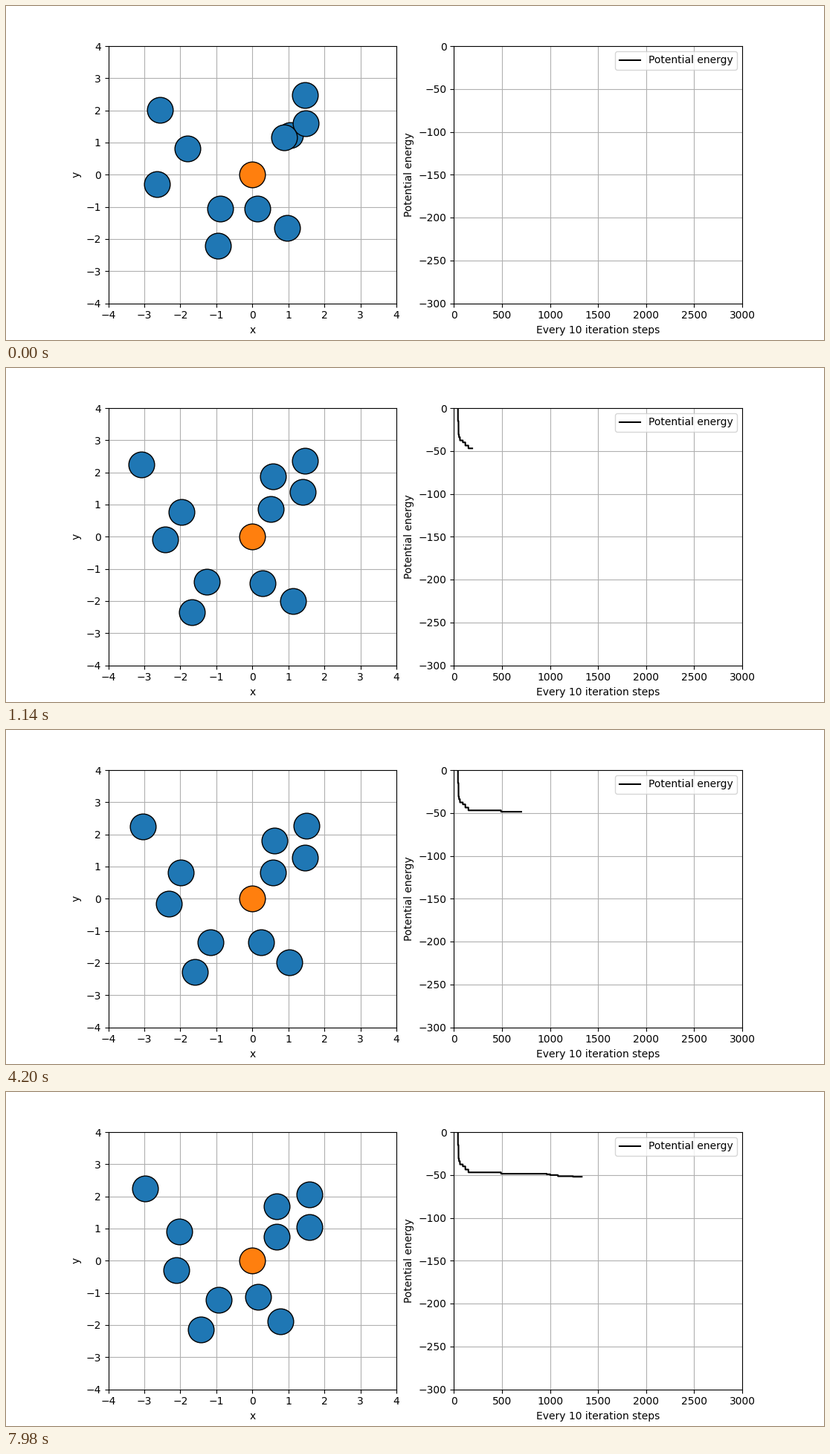
Recreate the animation shown at these times as a matplotlib script. Size 1100 px wide and 450 px high, loop 8 s.

```python
import numpy as np
import matplotlib.pyplot as plt
from matplotlib.animation import FuncAnimation

LOOP_MS = 8000
TICK_MS = 40
STEP_MS = 60          # duration of one simulation step
ITERS_PER_STEP = 10
SETTLE_STEPS = 15     # the particles scatter quickly, then rest between drops

# Pixels per data unit, and the pixel position of the fixed particle
SCALE = np.array([48.4375, -43.3125])
CENTER = np.array([331, 227])

# Energy level reached at each accepted iteration
DROPS = {0: 50, 41: -15, 47: -31, 52: -34, 62: -37.7, 92: -40, 118: -43.7,
         150: -47, 490: -48.6, 965: -49.2, 1000: -50.1, 1082: -51.5, 1240: -52.1}
DROP_ITERS = np.array(list(DROPS))
LEVELS = np.array(list(DROPS.values()))


def pose(xs, ys):
    """Particle positions in data units from stage pixels."""
    return (np.column_stack([xs, ys]) - CENTER) / SCALE


START = pose([382, 207, 244, 203, 288, 338, 378, 285, 402, 403, 374],
             [174, 140, 192, 240, 273, 273, 299, 323, 120, 158, 177])
SETTLED = pose([359, 182, 236, 214, 270, 345, 386, 250, 402, 399, 356],
               [146, 130, 194, 231, 288, 290, 314, 329, 125, 167, 190])
FINAL = pose([364, 187, 233, 229, 286, 339, 369, 262, 408, 408, 364],
             [154, 130, 188, 240, 280, 276, 309, 320, 138, 182, 195])


def energy(iters):
    return LEVELS[np.searchsorted(DROP_ITERS, iters, side="right") - 1]


def positions(step):
    if step < SETTLE_STEPS:
        ease = 1 - (1 - step / SETTLE_STEPS) ** 2
        return START + ease * (SETTLED - START)
    # Later moves follow the energy from its plateau down to its last level
    plateau = DROPS[SETTLE_STEPS * ITERS_PER_STEP]
    progress = (energy(step * ITERS_PER_STEP) - plateau) / (LEVELS[-1] - plateau)
    return SETTLED + progress * (FINAL - SETTLED)


fig, (box, chart) = plt.subplots(1, 2, figsize=(11, 4.5), dpi=100)

box.set(xlim=(-4, 4), ylim=(-4, 4), xlabel="x", ylabel="y")
box.grid()
disc = dict(marker="o", linestyle="", markersize=25, markeredgecolor="k")
particles, = box.plot([], [], color="C0", **disc)
box.plot([0], [0], color="C1", **disc)

chart.set(xlim=(0, 3000), ylim=(-300, 0),
          xlabel="Every 10 iteration steps", ylabel="Potential energy")
chart.grid()
curve, = chart.plot([], [], "k", label="Potential energy")
chart.legend(loc="upper right")


def update(frame):
    step = (frame * TICK_MS + TICK_MS - 1) // STEP_MS
    iters = np.arange(step * ITERS_PER_STEP + 1)
    particles.set_data(*positions(step).T)
    curve.set_data(iters, energy(iters))
    return particles, curve


anim = FuncAnimation(fig, update, frames=LOOP_MS // TICK_MS, interval=TICK_MS,
                     repeat=True, repeat_delay=0)
plt.show()
```
